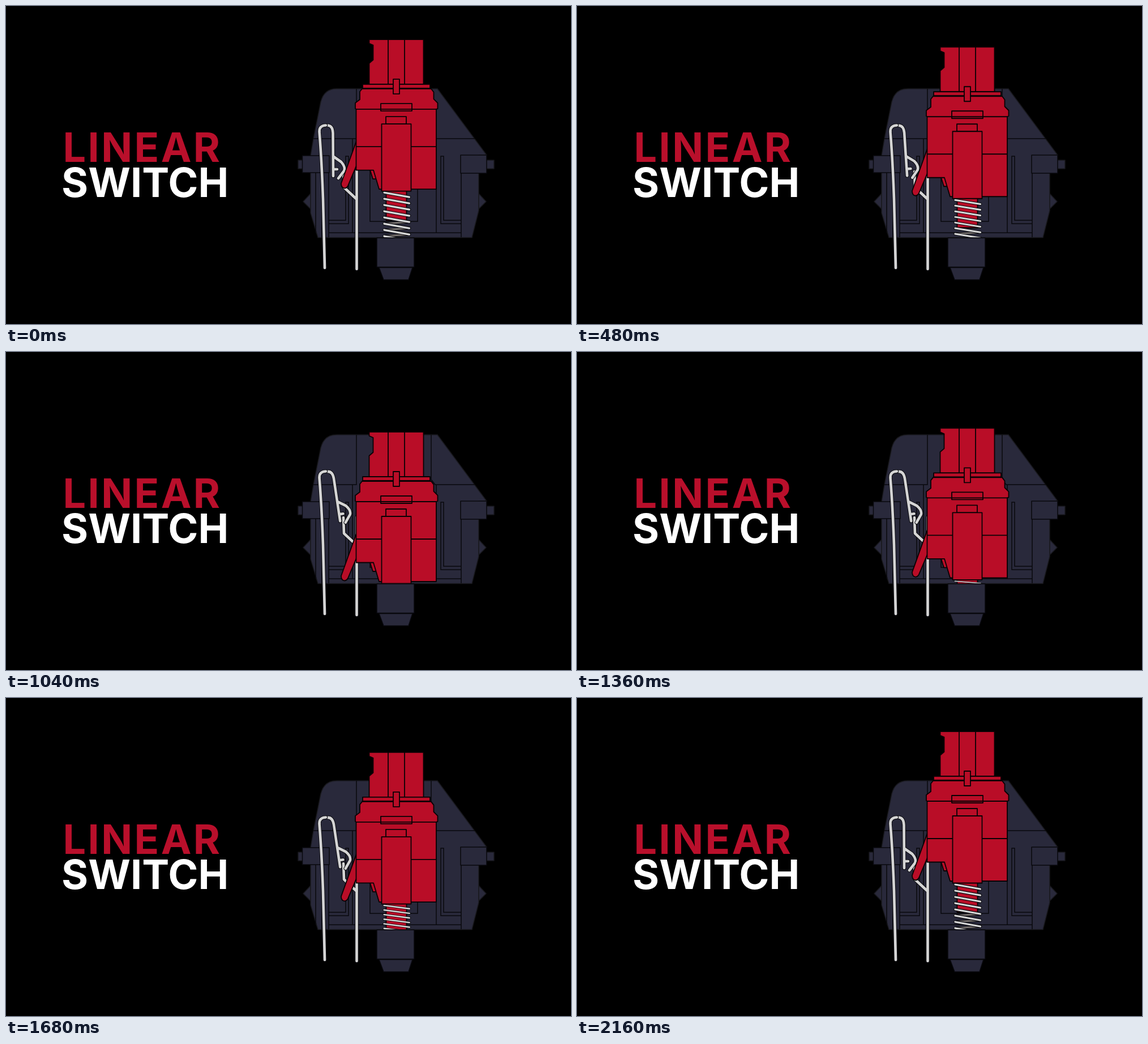
Animation, 998 px wide and 561 px high, one loop 2320 ms. Source, as an HTML page:

```html
<!DOCTYPE html>
<html lang="en">
<head>
<meta charset="utf-8">
<title>Linear switch</title>
<style>
  html, body { margin: 0; width: 100%; height: 100%; overflow: hidden; background: #000; }
  svg { display: block; width: 100%; height: 100%; }
  text { font: 700 72px Inter, "Open Sans", sans-serif; }
  .housing { fill: #29293b; stroke: #08080d; stroke-width: 1.5; stroke-linejoin: round; }
  .outline { stroke: #19191e; }
  .seam { fill: none; stroke: #08080d; stroke-width: 1.5; }
  .stem { fill: #b90d27; stroke: #080204; stroke-width: 1.8; stroke-linejoin: round; }
  .wire { fill: none; stroke-linecap: round; stroke-linejoin: round; }
  .edge { stroke: #0b0b10; stroke-width: 6.6; }
  .core { stroke: #d5d5d5; stroke-width: 4.6; }
</style>
</head>
<body>
<svg viewBox="0 0 998 561">
  <defs>
    <clipPath id="cavity"><rect x="500" width="400" height="408.5"/></clipPath>
    <path id="fixedLeaf" d="M596 292 L597 320 L619.5 341 M619.5 291 V464"/>
    <path id="outerLeaf" d="M563 462 L560 340 Q557.5 270 553.5 222 Q553 211 565 210.5"/>
    <path id="innerLeaf" d="M568 210.5 Q577 211 577.5 224 L578 300 M579 266 L592 275 Q600 284 597 291 L587 304 M579 288 H585"/>
  </defs>

  <text x="100.5" y="275" fill="#b90f2b" letter-spacing="3.4">LINEAR</text>
  <text x="98" y="336.7" fill="#fff" letter-spacing=".1">SWITCH</text>

  <g class="housing outline">
    <path d="M516 272 H524 V287 H516 Z M848 272 H862 V287 H848 Z"/>
    <path d="M538 331 L525 345 L538 358 Z M835 331 L848 345 L835 358 Z"/>
    <path d="M538 264 L543 234 L556 169 Q562 146 584 146 H762 L849 263 H835 V361 L823 408.5 H551 L538 365 Z"/>
  </g>
  <g class="seam">
    <path d="M542 234 H619 V146 M751 146 V225 L758 234 H828"/>
    <path d="M612 234 V400 M760 234 V400 M570 400 H804 M643 290 V380 H727 V290"/>
    <path d="M570 378 H600 V265 H605 V384 H570 M804 378 H773 V265 H768 V384 H804"/>
    <path d="M547 294 V400 M558 294 V408 M570 294 V408 M804 294 V408"/>
  </g>
  <path class="housing" d="M523.5 264 H571 V294 H523.5 Z M803 263 H849 V295 H803 Z"/>

  <g class="wire">
    <use href="#fixedLeaf" class="edge"/><use href="#fixedLeaf" class="core"/>
    <g id="flex">
      <use href="#innerLeaf" class="edge"/><use href="#innerLeaf" class="core"/>
    </g>
    <use href="#outerLeaf" class="edge"/><use href="#outerLeaf" class="core"/>
  </g>

  <g clip-path="url(#cavity)">
    <g id="backCoils" class="wire"></g>
    <path id="post" class="stem" d="M671.5 300 H707.5 V378 H671.5 Z"/>
    <g id="frontCoils" class="wire"></g>
    <g id="stem" class="stem">
      <path d="M619 238 L592 313 Q592 321 598 321.5 Q602 321 604 317 L620 279 Z"/>
      <path d="M642 286 L648 305 H656 V286 Z"/>
      <path d="M641.5 59 H737.5 V138 H641.5 V101 L648.5 95 V69 L641.5 66 Z M675 60 V138 M704 60 V138"/>
      <path d="M630 138 H749 V145 H630 Z"/>
      <path d="M629 146 H751 L755.5 152 V164 L762.5 171 V181 L760 182 V323 H659 L649 289.5 H618.5 V182 L617 181 V171 L625 165 V151 Z"/>
      <path d="M618 182 H761 M619 248 H760 M662 172 H717 V185 H662 Z"/>
      <path d="M684 129 H695 V155 H684 Z M671 195 H707 V208 H671 Z"/>
      <path d="M663.5 208 H715.5 V326.5 H663.5 Z"/>
    </g>
  </g>

  <path class="housing" d="M655 409 H721 V460.5 H655 Z M659 461.5 H718 L711 483 H667 Z"/>
</svg>
<script>
  const LOOP = 2320, STEP = 80, REST = 240, LAST_STEP = 24;
  const TRAVEL = 85.5;
  const SPRING_TOP = 329, SPRING_BASE = 470, PITCH = 11;
  const byId = id => document.getElementById(id);
  const [flex, post, stem, backCoils, frontCoils] =
    ["flex", "post", "stem", "backCoils", "frontCoils"].map(byId);

  const line = (x1, y1, x2, y2, color, width) =>
    `<path d="M${x1} ${y1} L${x2} ${y2}" stroke="${color}" stroke-width="${width}"/>`;

  for (let y = SPRING_TOP; y < SPRING_BASE; y += PITCH) {
    backCoils.innerHTML += line(712, y + 8, 668, y + PITCH, "#0b0b10", 4.8)
      + line(712, y + 8, 668, y + PITCH, "#77716f", 3);
    frontCoils.innerHTML += line(668, y, 712.5, y + 8, "#0b0b10", 5.4)
      + line(668, y, 712.5, y + 8, "#dadada", 3.3);
  }

  // Press phase: [step, share of the stroke]
  const phases = [[0, .015], [6, .5], [10, .87], [11.2, 1], [23.7, 0], [LAST_STEP, 0]];

  function pressDepth(step) {
    const i = Math.max(1, phases.findIndex(([at]) => at >= step));
    const [a, from] = phases[i - 1], [b, to] = phases[i];
    const share = from + (to - from) * (step - a) / (b - a);
    return TRAVEL * (1 - Math.cos(Math.PI * share)) / 2;
  }

  function draw(time) {
    const step = Math.floor((time % LOOP - REST) / STEP);
    const depth = pressDepth(Math.min(LAST_STEP, Math.max(0, step)));
    const move = `translate(0 ${depth})`;
    stem.setAttribute("transform", move);
    post.setAttribute("transform", move);

    // The spring's top follows the stem, its base sits hidden in the foot.
    const scale = 1 - depth / (SPRING_BASE - SPRING_TOP);
    const squeeze = `translate(0 ${SPRING_BASE}) scale(1 ${scale}) translate(0 ${-SPRING_BASE})`;
    backCoils.setAttribute("transform", squeeze);
    frontCoils.setAttribute("transform", squeeze);

    // The leaf springs outward until the stem's leg lets go of it.
    const shift = Math.min(12, depth * .38);
    flex.setAttribute("transform", `rotate(${-Math.asin(shift / 85) * 180 / Math.PI} 571 213)`);
  }

  const start = performance.now();
  function tick() {
    draw(performance.now() - start);
    requestAnimationFrame(tick);
  }
  tick();
</script>
</body>
</html>
```
